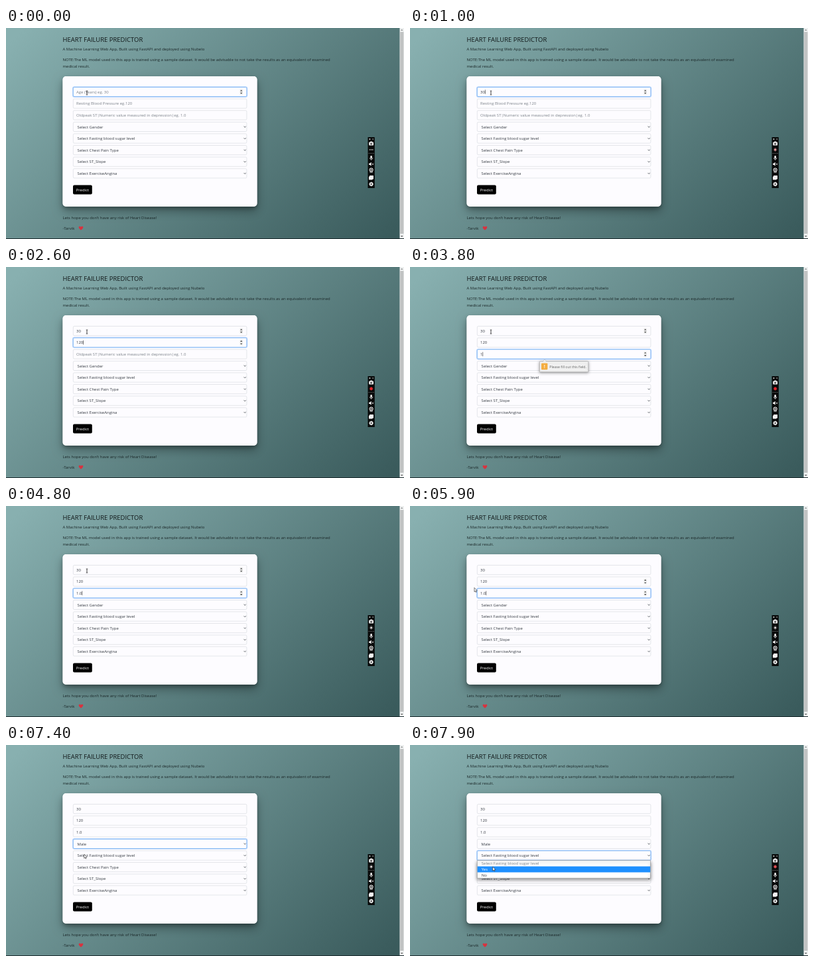
Write an HTML page with a canvas that moves like this. It is 600 px wide and 319 px high and loops after 8000 ms.

```html
<!DOCTYPE html>
<html lang="en">
<head>
<meta charset="utf-8">
<title>Heart Failure Predictor</title>
<style>
html, body { margin: 0; width: 100%; height: 100%; overflow: hidden; background: #5b8283; }
canvas { display: block; width: 600px; height: 319px; }
</style>
</head>
<body>
<canvas id="stage" width="600" height="319"></canvas>
<script>
const ctx = document.getElementById('stage').getContext('2d');
const LOOP = 8000;
const INK = '#343a40', HINT = '#7b8288';
const ROW0 = 96.6, ROW = 17.6;
const rowY = i => ROW0 + i * ROW;

// Typing: [time, value]
const typed = [
  [[500, '3'], [700, '30']],
  [[1900, '1'], [2100, '12'], [2300, '120']],
  [[3700, '1'], [4500, '1.'], [4800, '1.0']]
];
const hints = ['Age (Years) eg. 30', 'Resting Blood Pressure eg.120',
  'Oldpeak ST|Numeric value measured in depression|eg. 1.0'];
const selects = ['Select Gender', 'Select Fasting blood sugar level',
  'Select Chest Pain Type', 'Select ST_Slope', 'Select ExerciseAngina'];
const focusTimes = [[0, 0], [1200, 1], [3000, 2], [6500, 3], [7550, 4]];
const mouse = [[5200, 122, 96], [5600, 113, 113], [5900, 97, 123.5], [6020, 54, 125],
  [6150, 46, 128], [6500, 118, 148], [6800, 120.5, 156], [7000, 117, 163],
  [7200, 114, 168], [7500, 119, 164], [7700, 122, 174], [7900, 124.7, 184]];

const clamp = v => Math.max(0, Math.min(1, v));
const lastOf = (keys, t) => keys.filter(k => k[0] <= t).pop();

function text(str, x, y, size = 5.98, color = INK, align = 'left', weight = 400) {
  ctx.save();
  ctx.translate(x, y);
  ctx.scale(.1, .1);
  ctx.font = `${weight} ${size * 10}px "Open Sans", "Noto Sans", sans-serif`;
  ctx.fillStyle = color;
  ctx.textAlign = align;
  ctx.fillText(str, 0, 0);
  const w = ctx.measureText(str).width / 10;
  ctx.restore();
  return w;
}

function box(x, y, w, h, r, fill, stroke, lw = .6) {
  ctx.beginPath();
  ctx.roundRect(x, y, w, h, r);
  if (fill) { ctx.fillStyle = fill; ctx.fill(); }
  if (stroke) { ctx.strokeStyle = stroke; ctx.lineWidth = lw; ctx.stroke(); }
}

function poly(pts, fill, stroke, lw = .7) {
  ctx.beginPath();
  for (let i = 0; i < pts.length; i += 2) ctx.lineTo(pts[i], pts[i + 1]);
  if (fill) { ctx.closePath(); ctx.fillStyle = fill; ctx.fill(); }
  if (stroke) { ctx.strokeStyle = stroke; ctx.lineWidth = lw; ctx.stroke(); }
}

function dot(x, y, r, fill) {
  ctx.beginPath();
  ctx.arc(x, y, r, 0, Math.PI * 2);
  ctx.fillStyle = fill;
  ctx.fill();
}

function shadowed(color, blur, dy, paint) {
  ctx.save();
  ctx.shadowColor = color;
  ctx.shadowBlur = blur;
  ctx.shadowOffsetY = dy;
  paint();
  ctx.restore();
}

function page() {
  const g = ctx.createLinearGradient(90, -60, 510, 379);
  g.addColorStop(0, '#88b0b0');
  g.addColorStop(1, '#3a5b5c');
  ctx.fillStyle = g;
  ctx.fillRect(0, 0, 600, 319);
  text('HEART FAILURE PREDICTOR', 85.5, 21.2, 9.45, '#101718');
  const ink = '#1b2728';
  text('A Machine Learning Web App, Built using FastAPI and deployed using Nubelo', 85.5, 34.4, 5.98, ink);
  text('NOTE:The ML model used in this app is trained using a sample dataset. It would be advisable to not take the results as an equivalent of examined', 85.5, 50.1, 5.98, ink);
  text('medical result.', 85.5, 59.5, 5.98, ink);
  text('Lets hope you don\u2019t have any risk of Heart Disease!', 85.5, 289, 5.98, ink);
  text('-Tarvik', 85.5, 304.7, 5.98, ink);
  heart(113, 302.6);
  const card = () => box(85.5, 73, 293, 197, 5, '#fdfcff');
  shadowed('rgba(0,0,0,.32)', 15, 7, card);
  shadowed('rgba(0,0,0,.25)', 5, 3, card);
  box(101, 237.6, 28.8, 14, 2, '#000');
  text('Predict', 115.4, 246.8, 5.98, '#fff', 'center');
  // scrollbar and lower screen edge
  ctx.fillStyle = '#eef0f0';
  ctx.fillRect(593.5, 0, 6.5, 319);
  ctx.fillStyle = '#c1c3c3';
  ctx.fillRect(594.2, 6, 5.2, 305);
  poly([595.2, 3.8, 596.8, 2, 598.4, 3.8], '#777');
  poly([595.2, 314, 596.8, 316, 598.4, 314], '#555');
  ctx.fillStyle = '#1d2c2f';
  ctx.fillRect(0, 318, 600, 1);
}

function heart(x, y) {
  ctx.beginPath();
  ctx.moveTo(x, y + 3);
  ctx.bezierCurveTo(x - 6, y - 1, x - 2.4, y - 4.6, x, y - 1.8);
  ctx.bezierCurveTo(x + 2.4, y - 4.6, x + 6, y - 1, x, y + 3);
  ctx.fillStyle = '#d8323f';
  ctx.fill();
}

function frame(y, focused) {
  if (focused) box(100.6, y - 7.7, 263, 15.4, 2.4, null, 'rgba(80,155,250,.35)', 1.3);
  box(101.3, y - 7.1, 261.6, 14.2, 1.7, '#fdfcff', focused ? '#79b2f2' : '#d3d7dc', focused ? .9 : .6);
}

function spinner(y) {
  box(352.3, y - 4.2, 4.8, 8.4, 0, '#efefef');
  poly([353, y - 1.2, 354.7, y - 3.1, 356.4, y - 1.2], '#444');
  poly([353, y + 1.2, 354.7, y + 3.1, 356.4, y + 1.2], '#444');
}

function form(t, focus, focusAt) {
  const hover = t < 5450 ? 0 : t < 5950 ? 1 : -1;
  typed.forEach((keys, i) => {
    const y = rowY(i), key = lastOf(keys, t);
    frame(y, focus === i);
    let w = 0;
    if (key) w = text(key[1], 106, y + 2.2);
    else text(hints[i], 106, y + 2.2, 5.98, HINT);
    if (focus === i || hover === i) spinner(y);
    const edit = Math.max(key ? key[0] : -600, focusAt || -600);
    if (focus === i && (t - edit) % 1000 < 500) {
      ctx.fillStyle = '#222';
      ctx.fillRect(106.1 + w, y - 3.2, .6, 6.4);
    }
  });
  selects.forEach((label, i) => {
    const y = rowY(i + 3);
    frame(y, focus === i + 3);
    text(i === 0 && t >= 7200 ? 'Male' : label, 107.6, y + 2.2);
    poly([358.6, y - .8, 360.2, y + .8, 361.8, y - .8], null, INK, .8);
  });
}

function tip(y, alpha) {
  if (alpha <= 0) return;
  ctx.save();
  ctx.globalAlpha = alpha;
  shadowed('rgba(0,0,0,.4)', 4, 1.2, () => box(195.3, y, 73.6, 16.2, 1, '#fff', '#8d8d8d', .6));
  poly([200, y + .4, 203, y - 2.8, 206, y + .4], '#fff', '#8d8d8d', .5);
  box(200.2, y + .2, 5.6, .8, 0, '#fff');
  box(198, y + 3, 9.4, 9.6, 1, '#f5a021');
  text('!', 202.7, y + 10.4, 7, '#fff', 'center', 700);
  text('Please fill out this field.', 210.3, y + 10, 5.2, '#4a4a4a');
  ctx.restore();
}

function menu(y, items, hot, hotFill) {
  const h = 8.8;
  shadowed('rgba(0,0,0,.4)', 5, 2.5, () =>
    box(101.3, y, 261.2, items.length * h + .4, 0, '#fff', '#8a8d90', .6));
  items.forEach((item, i) => {
    const top = y + i * h;
    if (i === hot) box(101.6, top + .2, 260.6, h, 0, hotFill);
    text(item, 107.8, top + 6.6, 5.98, i === hot ? '#fff' : i ? INK : HINT);
  });
}

function toolbar(t) {
  box(545.5, 165, 10.3, 77, .6, '#080a0a');
  const W = '#f4f4f4', x = 550.6;
  poly([547.4, 168, 549.4, 168], null, W, .8);
  poly([548.4, 167, 548.4, 169], null, W, .8);
  poly([552.4, 167, 554, 169], null, '#aaa', .6);
  poly([554, 167, 552.4, 169], null, '#aaa', .6);
  // camera
  box(547.2, 172.6, 6.8, 5, .8, W);
  box(549, 171.4, 3.2, 2, .5, W);
  dot(x, 175, 1.5, '#111');
  dot(x, 175, .7, W);
  // recording light
  const red = Math.max(0, Math.cos((t - 1250) / 1300 * Math.PI * 2));
  const mix = (a, b) => Math.round(a + (b - a) * red);
  if (t < 150) [-2.2, 0, 2.2].forEach(d => dot(x + d, 184, .8, W));
  else {
    const light = `rgb(${mix(235, 226)},${mix(228, 32)},${mix(228, 38)})`;
    dot(x, 184, 1.5 + red * .8, light);
    for (let a = 0; a < 8; a++) {
      const c = Math.cos(a * Math.PI / 4), s = Math.sin(a * Math.PI / 4);
      poly([x + c * 2, 184 + s * 2, x + c * 2.9, 184 + s * 2.9], null, light, .6);
    }
  }
  text('00:00:00', x, 190.4, 2.2, '#d0d0d0', 'center');
  // microphone
  box(549.4, 193, 2.4, 4.4, 1.2, W);
  ctx.beginPath();
  ctx.arc(x, 196.3, 2.3, 0, Math.PI);
  ctx.strokeStyle = W;
  ctx.lineWidth = .7;
  ctx.stroke();
  poly([x, 198.5, x, 200], null, W);
  // speaker
  poly([547.2, 204.5, 548.6, 204.5, 550.6, 202.8, 550.6, 208.6, 548.6, 207, 547.2, 207], W);
  poly([551.8, 204.5, 554, 207], null, W);
  poly([554, 204.5, 551.8, 207], null, W);
  // webcam
  dot(x, 214.5, 3, W);
  dot(x, 214.5, 2, '#111');
  dot(x, 214.5, 1.1, W);
  box(548.2, 217.4, 4.8, 1, .4, W);
  // window
  box(548, 223, 6, 5.6, .6, W);
  box(547, 224.4, 5.6, 5, .6, W);
  // gear
  for (let a = 0; a < 4; a++) {
    const c = Math.cos(a * Math.PI / 4) * 3.3, s = Math.sin(a * Math.PI / 4) * 3.3;
    poly([x - c, 236 - s, x + c, 236 + s], null, W, 1.3);
  }
  dot(x, 236, 2.5, W);
  dot(x, 236, 1.1, '#111');
}

function mouseAt(t) {
  const i = mouse.findIndex(k => k[0] > t);
  if (i === 0) return mouse[0].slice(1);
  if (i < 0) return mouse[mouse.length - 1].slice(1);
  const [a, b] = [mouse[i - 1], mouse[i]];
  const u = (t - a[0]) / (b[0] - a[0]), e = u * u * (3 - 2 * u);
  return [a[1] + (b[1] - a[1]) * e, a[2] + (b[2] - a[2]) * e];
}

function pointer(t) {
  const [x, y] = mouseAt(t);
  if (x > 101 && y < 139) {
    const top = y - 1, end = y + 5;
    poly([x, top, x, end], null, '#111', .8);
    poly([x - 1.3, top, x + 1.3, top], null, '#111', .6);
    poly([x - 1.3, end, x + 1.3, end], null, '#111', .6);
  } else {
    poly([x, y, x, y + 6.2, x + 1.4, y + 5, x + 2.4, y + 7, x + 3.3, y + 6.5,
      x + 2.4, y + 4.6, x + 4.2, y + 4.4, x, y], '#fff', '#222', .6);
  }
}

function draw(t) {
  const [focusAt, focus] = lastOf(focusTimes, t);
  page();
  form(t, focus, focusAt);
  if (t >= 1200) tip(125, clamp((t - 1200) / 100) * clamp((2200 - t) / 300));
  if (t >= 3000) tip(142.6, clamp((t - 3000) / 100) * clamp((4100 - t) / 350));
  if (t >= 6500 && t < 7200) menu(156.6, [selects[0], 'Male', 'Female'],
    t < 7000 ? 0 : 1, t < 7000 ? '#c6c6c8' : '#1e90ff');
  if (t >= 7550) menu(174.6, [selects[1], 'Yes', 'No'],
    t < 7900 ? 0 : 1, t < 7900 ? '#c6c6c8' : '#1e90ff');
  toolbar(t);
  pointer(t);
}

const start = performance.now();
function tick() {
  draw((performance.now() - start) % LOOP);
  requestAnimationFrame(tick);
}
tick();
</script>
</body>
</html>
```
